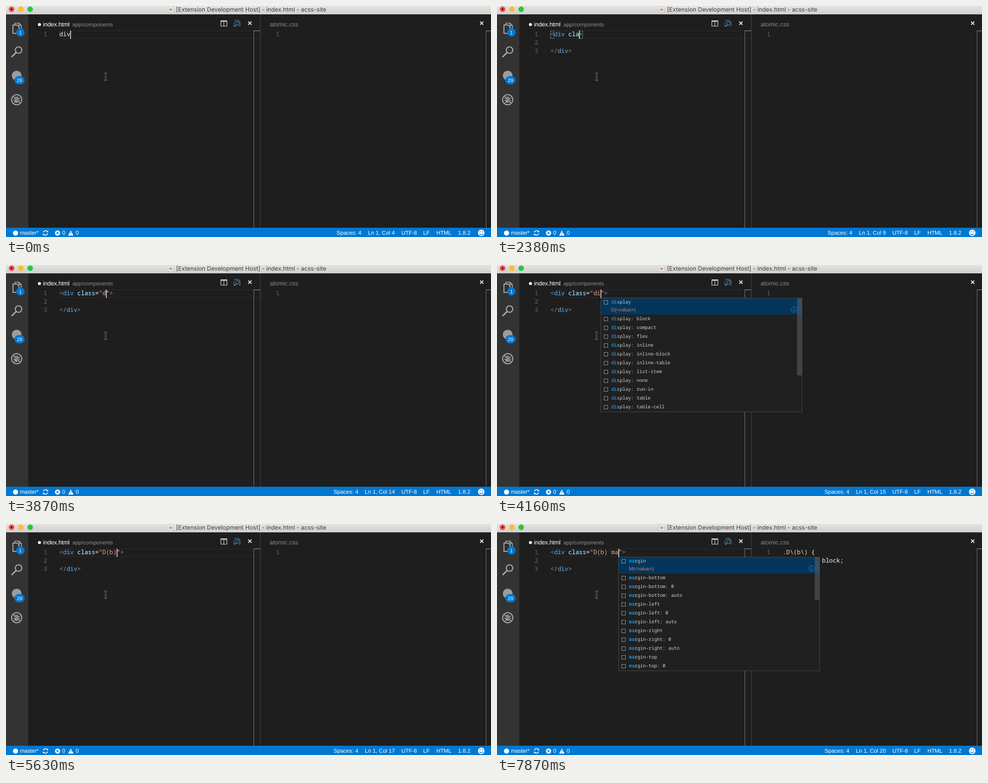
Animation of 1044x498 px, one loop 8000 ms. Source, as an HTML page:

```html
<!DOCTYPE html>
<html lang="en">
<head>
<meta charset="utf-8">
<title>Editor demo</title>
<style>
html, body { margin: 0; width: 100%; height: 100%; overflow: hidden; background: #1e1e1e; }
svg { display: block; width: 1044px; height: 498px; }
text { white-space: pre; text-rendering: geometricPrecision; font-family: "Liberation Sans", Arial, sans-serif; }
.code text { font: 12.83px "Noto Sans Mono", "DejaVu Sans Mono", monospace; stroke-width: .25px; }
.item { font: 10.08px "Noto Sans Mono", "DejaVu Sans Mono", monospace; }
.status { font-size: 12px; fill: #fff; }
.title { font: 12.65px Inter, Roboto, sans-serif; fill: #3e3e3e; }
.line { fill: none; stroke-linecap: butt; }
</style>
</head>
<body>
<svg viewBox="0 0 1044 498" xmlns="http://www.w3.org/2000/svg">
  <defs>
    <linearGradient id="bar" x2="0" y2="1">
      <stop offset="0" stop-color="#e2e2e2"/><stop offset="1" stop-color="#d0d0d0"/>
    </linearGradient>
  </defs>
  <rect width="1044" height="498" fill="#1e1e1e"/>
  <rect y="18" width="48" height="460" fill="#333"/>

  <!-- title bar -->
  <rect width="1044" height="18" fill="url(#bar)"/>
  <circle cx="12" cy="7" r="6" fill="#fc4a48"/>
  <circle cx="32" cy="7" r="6" fill="#fdbd2e"/>
  <circle cx="52" cy="7" r="6" fill="#27c73f"/>
  <circle id="closeDot" cx="12" cy="7" r="2" fill="#4c0808"/>
  <g id="docIcon">
    <path d="M349.5 1.5h7l3 3v9.500h-10z" fill="#fff" stroke="#aaa" stroke-width=".8"/>
    <circle cx="354.500" cy="8" r="3" fill="#d9584a"/>
  </g>
  <text class="title" x="366" y="12">[Extension Development Host] - index.html - acss-site</text>

  <!-- activity bar -->
  <g class="line" stroke="#adadad" stroke-width="2">
    <path d="M19 40V37h9l5 5v11h-3M28 37v5h5" stroke-width="1.700"/>
    <path d="M15 41h9l4 4v14H15z" fill="#333"/>
    <circle cx="27" cy="95" r="7" stroke-width="2.200"/>
    <path d="M21.500 100.500L12 110" stroke-width="3"/>
  </g>
  <circle cx="23" cy="150" r="10.500" fill="#9c9c9c"/>
  <g class="line" stroke="#adadad" stroke-width="1.500">
    <ellipse cx="23" cy="203" rx="3.500" ry="5" fill="#adadad"/>
    <path d="M16 198l4 2.500M30 198l-4 2.500M15.500 203.500h15M17 209l3.500-3M29 209l-3.500-3M21 195l1 3M25 195l-1 3"/>
    <circle cx="23" cy="202" r="11" stroke-width="2"/>
    <path d="M15.500 194.500l15 15" stroke="#333" stroke-width="4"/>
    <path d="M15 194l16 16" stroke-width="2"/>
  </g>
  <circle cx="31" cy="57" r="9" fill="#0078d2"/>
  <rect x="18" y="151" width="22" height="18" rx="9" fill="#0078d2"/>
  <g font-size="10.500" fill="#fff" text-anchor="middle">
    <text x="31" y="61">1</text><text x="29" y="164">29</text>
  </g>

  <!-- tabs -->
  <circle cx="72" cy="40" r="3.200" fill="#fff" id="dirtyDot"/>
  <text x="79.500" y="44" font-size="13" letter-spacing="-.2" fill="#fff">index.html</text>
  <text x="143" y="44" font-size="11.800" fill="#8f8f8f">app/components</text>
  <text x="567.500" y="44" font-size="13" fill="#8a8a8a">atomic.css</text>
  <g class="line" stroke="#dedede">
    <path d="M462.500 32.500h13v11h-13zM469 32v11" stroke-width="1.200"/>
    <path d="M462 32.500h14" stroke-width="2.500"/>
    <path d="M521.500 33.500l7 7m0-7l-7 7M1020.500 33.500l7 7m0-7l-7 7" stroke-width="2"/>
  </g>
  <g class="line" stroke="#587184" stroke-width="1.300">
    <path d="M493 34v-3h7l4 4v8h-3M490.500 35v8h4"/>
    <circle cx="498.500" cy="37.500" r="3.500" stroke="#4c83a8"/>
    <path d="M496 40.500l-4.500 4" stroke="#4c83a8" stroke-width="2"/>
  </g>

  <rect id="curLine" x="114.500" width="432" height="16.500" fill="none" stroke="#2c2c2c"/>
  <g class="line">
    <path d="M547.500 18V478" stroke="#444"/>
    <path d="M533.500 53V478M1033.500 53V478" stroke="#7c7c7c"/>
    <path d="M533 53.500h14M1033 53.500h11" stroke="#a2a2a2"/>
  </g>

  <g id="code" class="code"></g>
  <rect id="caret" width="1.700" height="18" fill="#d8d8d8"/>
  <g id="popup"></g>

  <!-- mouse pointer -->
  <g class="line">
    <path id="beam" d="M211 144.500q3.500 0 3.500 2.500q0-2.500 3.500-2.500M214.500 147v10.500M211 160.500q3.500 0 3.500-3q0 3 3.500 3M212.500 153h4" stroke="#858585" stroke-width="2.200"/>
    <path d="M211 144.500q3.500 0 3.500 2.500q0-2.500 3.500-2.500M214.500 147v10.500M211 160.500q3.500 0 3.500-3q0 3 3.500 3M212.500 153h4" stroke="#111" stroke-width=".9"/>
  </g>

  <!-- status bar -->
  <rect y="478" width="1044" height="20" fill="#0078d2"/>
  <circle cx="20.500" cy="489.500" r="5.500" fill="#fff"/>
  <g class="line" stroke="#fff" stroke-width="1.500">
    <path d="M80.500 488a4.700 4.700 0 0 1 8.500-1.500M89.500 490.500a4.700 4.700 0 0 1-8.500 1.500"/>
    <path d="M90.500 484v3.800h-3.800zM79.500 495v-3.800h3.800z" fill="#fff" stroke="none"/>
    <circle cx="111" cy="489.500" r="5.500" fill="#fff" stroke="none"/>
    <path d="M108.800 487.300l4.400 4.400m0-4.400l-4.400 4.400" stroke="#0078d2"/>
    <path d="M139.500 484l5.700 11h-11.400z" fill="#fff" stroke="none"/>
    <path d="M139.500 487.500v3.500m0 1.200v1.500" stroke="#0078d2" stroke-width="1.300"/>
    <circle cx="1023" cy="489" r="7" fill="#fff" stroke="none"/>
    <path d="M1019.300 490.500a4 4 0 0 0 7.400 0" stroke="#0078d2" stroke-width="1.300"/>
    <path d="M1020.500 485.500v2.500m5-2.500v2.500" stroke="#0078d2" stroke-width="1.600"/>
  </g>
  <g class="status">
    <text x="30" y="493" letter-spacing="-.2">master*</text>
    <text x="121" y="493">0</text><text x="150" y="493">0</text>
    <text id="spaces" y="493">Spaces: 4</text>
    <text id="pos" y="493"></text>
    <text x="851" y="493" letter-spacing="-.15">UTF-8</text>
    <text x="898" y="493">LF</text>
    <text x="926.500" y="493" letter-spacing="-.2">HTML</text>
    <text x="973" y="493">1.8.2</text>
  </g>
</svg>
<script>
const LOOP = 8000, CW = 7.7, ROW = 18, LEFT = 115, RIGHT = 615;
const $ = id => document.getElementById(id);
const esc = s => s.replace(/&/g, '&amp;').replace(/</g, '&lt;').replace(/>/g, '&gt;');
const GREY = '#808080', BLUE = '#569cd6', SKY = '#9cdcfe', PLAIN = '#d4d4d4', STR = '#ce9178', GOLD = '#d7ba7d';

const lists = {
  display: {
    short: 'D', slider: 166,
    items: ['', ...'block compact flex inline inline-block inline-table list-item none run-in table table-cell'.split(' ')]
      .map(v => 'display' + (v && ': ' + v))
  },
  margin: {
    short: 'M', slider: 92,
    items: ['margin', ...['bottom', 'left', 'right', 'top'].flatMap(s =>
      ['', ': 0', ': auto'].map(v => `margin-${s}${v}`))].slice(0, 12)
  }
};

// Each step overrides part of the state before it.
const block = attr => [`<div${attr}>`, '', '</div>'];
const steps = [];
const add = (t, change) => steps.push({ ...steps[steps.length - 1], on: true, ...change, t });
const type = (t, attr, col, more) => add(t, { code: block(attr), ln: 1, col, pos: [1, col], ...more });

add(0, { code: ['div'], ln: 1, col: 4, pos: [1, 4], dirty: true, css: false, list: null, sel: 0 });
add(300, { code: ['<div></div>'], col: 6, pos: [1, 6] });
add(750, { code: block(''), ln: 2, col: 5 });
add(890, { pos: [2, 5] });
add(1490, { ln: 1 });
add(1640, { pos: [1, 5] });
[1940, 2080, 2230, 2380, 2530, 2670].forEach((t, i) => type(t, ' ' + 'class'.slice(0, i), 6 + i));
type(2820, ' class=""', 13);
add(3420, { on: false });
type(3870, ' class="d"', 14);
type(4010, ' class="di"', 15);
add(4160, { list: 'display' });
add(4600, { on: false });
add(5050, {});
add(5340, { sel: 1 });
add(5490, { code: block(' class="D(b)"'), col: 17, list: null, sel: 0 });
add(5630, { pos: [1, 17] });
add(6230, { on: false });
add(6670, { dirty: false });
add(7120, { css: true });
type(7270, ' class="D(b) "', 18, { dirty: true });
type(7720, ' class="D(b) m"', 19);
type(7870, ' class="D(b) ma"', 20, { list: 'margin' });

// Tokens are [text, colour] pairs set on the character grid.
function row(x, n, tokens) {
  let c = 0;
  return `<text y="${65 + n * ROW}">` + tokens.map(([s, col]) => {
    const span = `<tspan x="${x + c * CW}" fill="${col}" stroke="${col}">${esc(s)}</tspan>`;
    c += s.length;
    return span;
  }).join('') + '</text>';
}

function html(line) {
  if (line[0] !== '<') return [[line, PLAIN]];
  return line.match(/<\/?|>|"[^"]*"|=|\s+|\w+/g).map(s => [s,
    /[<>]/.test(s) ? GREY : s === 'div' ? BLUE : s[0] === '"' ? STR : s === '=' ? PLAIN : SKY]);
}

const cssRows = [
  [['.D\\(b\\)', GOLD], [' {', PLAIN]],
  [['  ', PLAIN], ['display', SKY], [': block;', PLAIN]],
  [['}', PLAIN]],
  []
];

const numbers = (x, n) => Array.from({ length: n }, (_, i) => row(x, i, [[String(i + 1), '#5a5a5a']])).join('');

function brackets(s) {
  const line = s.code[s.ln - 1], close = line.indexOf('>');
  if (s.ln !== 1 || close < 0 || (s.col - 1 !== close && s.col - 2 !== close)) return '';
  return [0, close].map(c =>
    `<rect x="${LEFT + c * CW + .3}" y="53.5" width="7.400" height="16.500" fill="#1b231b" stroke="#777"/>`).join('');
}

function popup(s) {
  if (!s.list) return '';
  const { short, slider, items } = lists[s.list];
  const x = Math.round(LEFT + (s.col - 1) * CW), w = 433;
  let y = 71, out = `<rect x="${x + .5}" y="71.500" width="${w}" height="245" fill="#202021" stroke="#474747"/>`;
  items.forEach((name, i) => {
    const on = i === s.sel, h = on ? 36 : 19;
    if (on) {
      const arg = i ? name.split(': ')[1][0] : '<value>';
      out += `<rect x="${x + 1}" y="${y + 1}" width="${w - 1}" height="${h - 1}" fill="#03365a"/>
        <text x="${x + 23}" y="${y + 29}" font-size="10.600" fill="#cf7f76">${short}(${esc(arg)})</text>
        <g fill="none" stroke="#2b7db5"><circle cx="${x + 416}" cy="${y + 25}" r="6"/>
        <path d="M${x + 416} ${y + 24}v5m0-8v1.700" stroke-width="1.500"/></g>`;
    }
    out += `<rect x="${x + 7.5}" y="${y + 5.5}" width="8" height="8" fill="none" stroke="#d6d6d6" stroke-dasharray="1.300 .7"/>
      <text class="item" y="${y + 12}"><tspan x="${x + 23}" fill="#1094ec" stroke="#1094ec" stroke-width=".3">${name.slice(0, 2)}</tspan><tspan
      x="${x + 35.1}" fill="#d0d0d0">${name.slice(2)}</tspan></text>`;
    y += h;
  });
  return out + `<rect x="${x + w - 10}" y="72" width="10" height="${slider}" fill="#797979" opacity=".4"/>`;
}

function draw(s) {
  const top = 53 + (s.ln - 1) * ROW, wide = s.pos[1] > 9;
  $('code').innerHTML = brackets(s) + numbers(81, s.code.length) + numbers(581, s.css ? 4 : 1) +
    s.code.map((l, i) => l ? row(LEFT, i, html(l)) : '').join('') +
    (s.css ? cssRows.map((r, i) => row(RIGHT, i, r)).join('') : '');
  $('popup').innerHTML = popup(s);
  $('curLine').setAttribute('y', top + .5);
  $('caret').setAttribute('x', LEFT + (s.col - 1) * CW);
  $('caret').setAttribute('y', top);
  $('caret').style.opacity = s.on ? 1 : 0;
  $('closeDot').style.opacity = $('dirtyDot').style.opacity = s.dirty ? 1 : 0;
  $('docIcon').style.opacity = s.dirty ? .55 : 1;
  $('pos').textContent = `Ln ${s.pos[0]}, Col ${s.pos[1]}`;
  $('pos').setAttribute('x', wide ? 772.5 : 779);
  $('spaces').setAttribute('x', wide ? 705 : 711.5);
}

let shown, start = performance.now();
function tick() {
  const t = (performance.now() - start) % LOOP;
  const s = steps.filter(p => p.t <= t).pop();
  if (s !== shown) draw(shown = s);
  requestAnimationFrame(tick);
}
tick();
</script>
</body>
</html>
```
